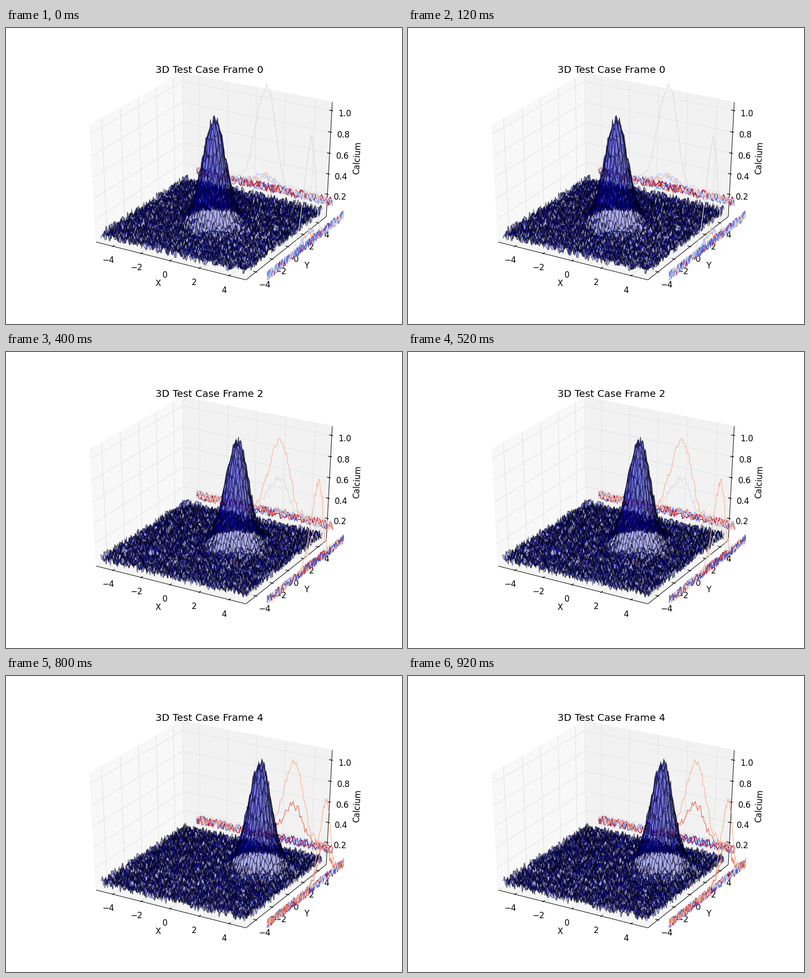
A matplotlib script that plays this animation: 800 px wide and 600 px high, repeating every 1000 ms.

```python
import numpy as np
import matplotlib.pyplot as plt
from matplotlib.animation import FuncAnimation
from matplotlib.collections import PolyCollection

plt.rcParams["font.family"] = "DejaVu Sans"
plt.rcParams["font.size"] = 12

# Camera at elevation 30, azimuth -60, distance 10 around a unit cube
C = np.sqrt(3) / 2
RIGHT = np.array([C, 0.5, 0])
UP = np.array([-0.25, C / 2, C])
TOWARD = np.array([C / 2, -0.75, 0.5])
DISTANCE = 10

H = 0.5 + 1 / 48            # half size of the panes
STEP = 1 / 12
N, STRIDE = 100, 2
LOW, HIGH = -5, 4.9         # range of the x and y data
WALL, FLOOR = 1.3 * HIGH, -0.15    # contour offsets
Z_TOP = [1.055, 1.074, 1.063, 1.063, 1.070]
XY_LEVELS = np.arange(-4.5, 4.6, 1.5)
Z_LEVELS = np.arange(1, 8) * 0.15

GRID = np.linspace(LOW, HIGH, N)
X, Y = np.meshgrid(GRID, GRID)

# Outline of one surface patch as row and column steps
PATCH_ROWS = np.array([0, 0, 0, 1, 2, 2, 2, 1])
PATCH_COLS = np.array([0, 1, 2, 2, 2, 1, 0, 0])

PANES = [
    (0.95, [(-H, -H, -H), (-H, H, -H), (-H, H, H), (-H, -H, H)]),
    (0.90, [(-H, H, -H), (H, H, -H), (H, H, H), (-H, H, H)]),
    (0.925, [(-H, -H, -H), (H, -H, -H), (H, H, -H), (-H, H, -H)]),
]
# Per axis: axis edge, the two further grid corners, tick direction
AXES = [
    ((0, -H, -H), (0, H, -H), (0, H, H), 1),
    ((H, 0, -H), (-H, 0, -H), (-H, 0, H), 0),
    ((H, H, 0), (-H, H, 0), (-H, -H, 0), 0),
]

fig = plt.figure(figsize=(8, 6), dpi=100, facecolor="white")
ax = fig.add_axes([0, 0, 1, 1])


def screen(points):
    """Project cube points to pixels; also return their distance."""
    points = np.asarray(points, float)
    w = DISTANCE - points @ TOWARD
    sx = 100 + 620 * (points @ RIGHT / w + 0.095) / 0.185
    sy = 540 - 480 * (points @ UP / w + 0.095) / 0.185
    return sx, sy, w


def unit(value):
    return (value - LOW) / (HIGH - LOW) - 0.5


def cube(x, y, z, top):
    x, y, z = np.broadcast_arrays(x, y, z)
    return np.stack([unit(x), unit(y), z / top - 0.5], axis=-1)


def line(points, color, width, zorder):
    sx, sy, _ = screen(points)
    ax.plot(sx, sy, color=color, lw=width, zorder=zorder,
            solid_capstyle="butt")


def at(point, index, value):
    moved = np.array(point, float)
    moved[index] = value
    return moved


def draw_panes():
    for gray, corners in PANES:
        sx, sy, _ = screen(corners)
        ax.fill(sx, sy, color=(gray,) * 3, alpha=0.5, lw=1, zorder=0)


def draw_axis(index, ticks):
    edge, second, third, tick_dir = AXES[index]
    line([at(edge, index, -H), at(edge, index, H)], "black", 0.75, 2)
    outward = np.sign(edge)
    side = outward * (np.arange(3) == tick_dir)
    for place, label in ticks:
        start = at(edge, index, place)
        line([start, at(second, index, place), at(third, index, place)],
             "0.9", 1, 1)
        line([start + side * 0.1 * STEP, start - side * 0.2 * STEP],
             "black", 1, 2)
        sx, sy, _ = screen(start + outward * 0.7 * STEP)
        ax.text(sx, sy + 14, label, ha="center", va="baseline", zorder=2)


def draw_contours(points, field, levels, zorder):
    """Draw each level on its own, the one reaching nearest on top."""
    sx, sy, w = screen(points)
    for level in levels:
        nearest = np.min(w, where=np.abs(field - level) < 0.06,
                         initial=DISTANCE + 1)
        ax.contour(sx, sy, field, levels=[level], cmap="coolwarm",
                   vmin=levels[0], vmax=levels[-1], linewidths=1,
                   zorder=zorder + (DISTANCE - nearest) / DISTANCE)


def draw_surface(z, top):
    starts = np.arange(0, N - 1, STRIDE)
    rows = np.minimum(starts[:, None, None] + PATCH_ROWS, N - 1)
    cols = np.minimum(starts[None, :, None] + PATCH_COLS, N - 1)
    patches = np.stack([X, Y, z], axis=-1)[rows, cols].reshape(-1, 8, 3)

    normals = np.cross(patches[:, 0] - patches[:, 3],
                       patches[:, 3] - patches[:, 6])
    normals /= np.linalg.norm(normals, axis=1, keepdims=True)
    shade = normals @ np.array([-1, -1, 0.5])
    shade = (shade - shade.min()) / np.ptp(shade)
    colors = np.zeros((len(patches), 4))
    colors[:, 2] = 0.5 + 0.5 * shade
    colors[:, 3] = 0.3

    sx, sy, w = screen(cube(*np.moveaxis(patches, -1, 0), top))
    order = np.argsort(-w.mean(axis=1))
    ax.add_collection(PolyCollection(
        np.stack([sx, sy], axis=-1)[order], facecolors=colors[order],
        edgecolors=(0, 0, 0, 0.35), linewidths=1, zorder=4))


def draw(k):
    ax.clear()
    ax.set_axis_off()
    ax.set_xlim(0, 800)
    ax.set_ylim(600, 0)

    top = Z_TOP[k]
    center = 0.5 * k
    noise = 0.1 * np.random.default_rng(k + 11).random((N, N))
    z = np.exp(-(X - center) ** 2 - (Y - center) ** 2) + noise
    z *= top / z.max()

    draw_panes()
    plane_ticks = [(unit(v), str(v).replace("-", "\u2212"))
                   for v in range(-4, 5, 2)]
    height_ticks = [(v / 10 / top - 0.5, f"{v / 10:.1f}")
                    for v in range(2, 11, 2)]
    for index, ticks in enumerate([plane_ticks, plane_ticks, height_ticks]):
        draw_axis(index, ticks)
    ax.text(307.5, 523, "X", ha="center", zorder=2)
    ax.text(607, 487, "Y", ha="center", zorder=2)
    ax.text(710, 263.5, "Calcium", ha="center", va="center",
            rotation=87, zorder=2)

    draw_contours(cube(X, WALL, z, top), Y, XY_LEVELS, 3)
    draw_contours(cube(X, Y, FLOOR, top), z, Z_LEVELS, 3)
    draw_surface(z, top)
    draw_contours(cube(WALL, Y, z, top), X, XY_LEVELS, 5)
    ax.text(410.5, 91, f"3D Test Case Frame {k}", ha="center",
            fontsize=14.4, zorder=6)
    return []


def start():
    return draw(0)


animation = FuncAnimation(fig, draw, frames=5, interval=200, init_func=start,
                          repeat=True, repeat_delay=0, blit=False)
plt.show()
```
